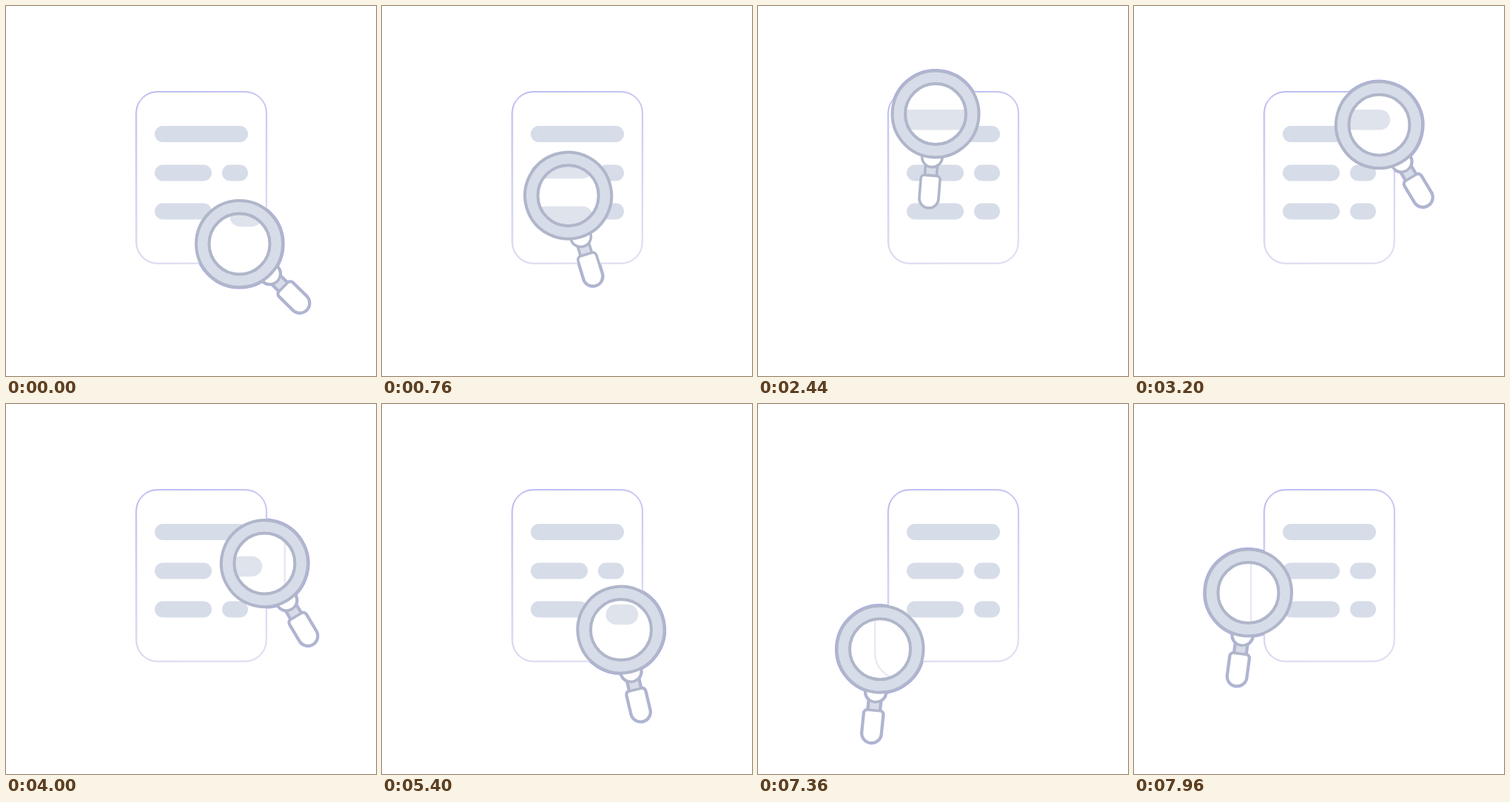
Animation, 500 px wide and 500 px high, one loop 8 s. Source, as an HTML page with a canvas:

```html
<!DOCTYPE html>
<html lang="en">
<head>
<meta charset="utf-8">
<title>Document search</title>
<style>
  html, body { margin: 0; width: 100%; height: 100%; overflow: hidden; background: #fff; }
  canvas { display: block; width: 100vmin; height: 100vmin; }
</style>
</head>
<body>
<canvas id="stage" width="500" height="500"></canvas>
<script>
const ctx = document.getElementById('stage').getContext('2d');
const LOOP = 8000, STEP = 40;
const FILL = '#d6dce8', LINE = '#b0b6ca', EDGE = '#e4e4f2', RIM = '#a5a1f8';

// Page outline: stronger at the top left, fading to the bottom right
const rim = ctx.createLinearGradient(176, 116, 270, 348);
rim.addColorStop(0, '#9a96f6');
rim.addColorStop(1, '#dcdaf2');

// Poses are [x, y, handle angle]; each move eases to its pose along a bent path
const home = [315.5, 321.5, 45.5];
const moves = [
  { at: 0,    ms: 1700, to: [184.6, 166.3, -26.8], bend: [-18, 0, 4] },
  { at: 1700, ms: 1780, to: [343, 166, 35.5],      bend: [-8.5, -43, -2.3] },
  { at: 3480, ms: 1320, to: [323.5, 305, 13.5],    bend: [29, 4, 6.5] },
  { at: 5360, ms: 1150, to: [165, 331.3, -5.8],    bend: [0, 0, 0] },
  { at: 7345, ms: 1160, to: [145.7, 191.3, -9.3],  bend: [0, 0, 0] }
];

function poseAt(t) {
  let pose = home;
  for (const { at, ms, to, bend } of moves) {
    if (t < at) break;
    const u = Math.min(1, (t - at) / ms);
    const s = u * u * (3 - 2 * u);
    pose = pose.map((p, i) => p + (to[i] - p) * s + 2 * s * (1 - s) * bend[i]);
  }
  return pose;
}

function paint(fill, stroke, width) {
  if (fill) { ctx.fillStyle = fill; ctx.fill(); }
  if (stroke) { ctx.strokeStyle = stroke; ctx.lineWidth = width; ctx.stroke(); }
}

function box(x, y, w, h, r, ...style) {
  ctx.beginPath();
  ctx.roundRect(x, y, w, h, r);
  paint(...style);
}

function disc(y, r, ...style) {
  ctx.beginPath();
  ctx.arc(0, y, r, 0, Math.PI * 2);
  paint(...style);
}

function page() {
  box(176.5, 116.5, 175, 231, 28, '#fff', EDGE, 2);
  box(201, 162, 126, 22, 11, FILL);
  for (const y of [214.5, 266.5]) {
    box(201, y, 77, 22, 11, FILL);
    box(292, y, 35, 22, 11, FILL);
  }
}

// Handle and ring, grown by an optional margin
function body([x, y, angle], line, grow = 0) {
  const width = 3.6 + 2 * grow;
  ctx.save();
  ctx.translate(x, y);
  ctx.rotate(-angle * Math.PI / 180);
  box(-8, 66, 16, 20, 0, FILL, line, width);
  disc(58, 13.8, '#fff', line, width);
  box(-13, 83.2, 26, 44, [5, 5, 13, 13], '#fff', line, width);
  disc(0, 58.5, FILL, line, 4 + 2 * grow);
  ctx.restore();
}

function glass([x, y]) {
  ctx.save();
  ctx.translate(x, y);
  ctx.save();
  disc(0, 41, '#fff');
  ctx.clip();
  ctx.translate(250 - x, 250 - y);
  ctx.scale(1.25, 1.25);
  ctx.translate(-250, -250);
  ctx.globalAlpha = 0.8;
  page();
  ctx.restore();
  disc(0, 41, null, LINE, 4);
  ctx.restore();
}

function draw(t) {
  const pose = poseAt(t);
  ctx.fillStyle = '#fff';
  ctx.fillRect(0, 0, 500, 500);
  // tinted outline that shows only outside the page
  body(pose, RIM, 0.6);
  page();
  box(175.7, 115.7, 176.6, 232.6, 28.8, null, rim, 1);
  body(pose, LINE);
  glass(pose);
}

let start;
function tick(now) {
  start ??= now;
  const t = (now - start) % LOOP;
  draw(Math.floor(t / STEP) * STEP);
  requestAnimationFrame(tick);
}
draw(0);
requestAnimationFrame(tick);
</script>
</body>
</html>
```
